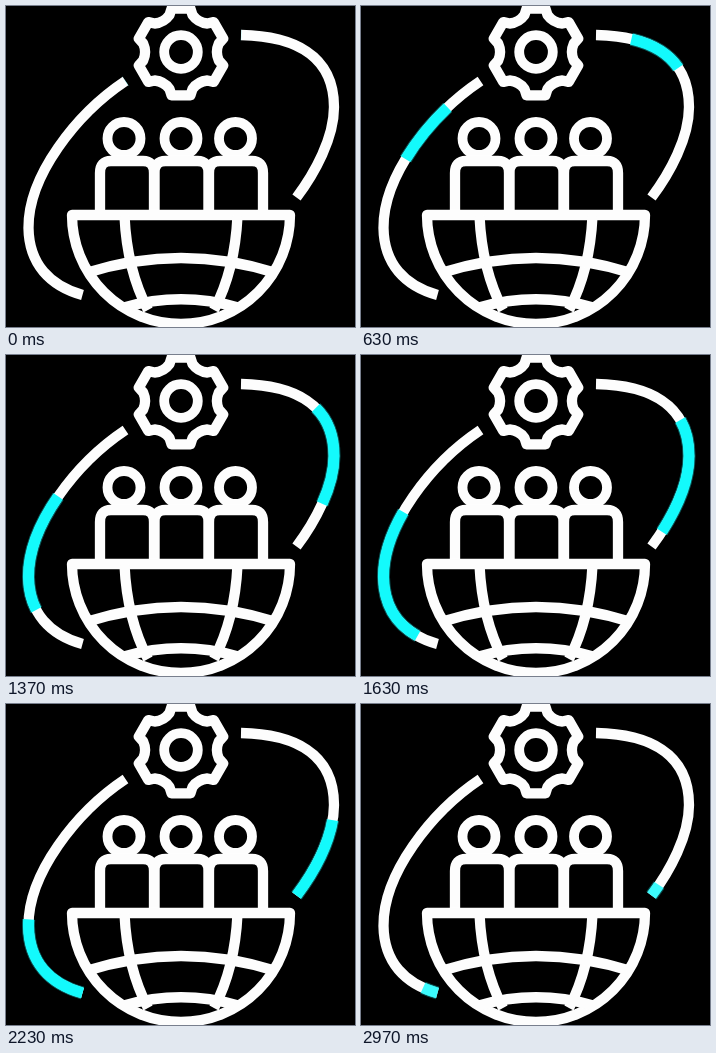
Animation of 349 by 321 pixels, one loop 3.01 s. Source, as an HTML page:

```html
<!DOCTYPE html>
<html lang="en">
<head>
<meta charset="utf-8">
<title>Team globe with orbiting arcs</title>
<style>
  html, body { margin: 0; width: 100%; height: 100%; overflow: hidden; background: #000; }
  svg { display: block; width: 349px; height: 321px; }
  .line { fill: none; stroke: #fdfdfd; stroke-width: 10.3; stroke-linejoin: round; }
  .ring { stroke-width: 9.8; }
  .glow { fill: none; stroke: #13fafc; stroke-width: 11; stroke-dasharray: 0 200; }
  .halo { stroke: #0b5a5c; stroke-width: 13; }
</style>
</head>
<body>
<svg viewBox="0 0 349 321">
  <defs>
    <path id="left" pathLength="100" d="M119.500 75C70 108 22 170 22.500 222C23 258 44 280 76.500 289"/>
    <path id="right" pathLength="100" d="M235 29C286 30 328 48 328 101C328 132 309 167 290.500 191.500"/>
    <path id="body" d="M-27 207V167Q-27 155 -16 155H16Q27 155 27 167V207"/>
    <circle id="head" cy="132.5" r="16.5"/>
  </defs>

  <use class="glow halo" href="#left"/>
  <use class="glow halo" href="#right"/>

  <g class="line">
    <use href="#left"/>
    <use href="#right"/>
    <path id="gear"/>
    <circle class="ring" cx="175" cy="46" r="16.8"/>
    <g id="team"></g>
    <path d="M66 209H284A109 109 0 0 1 66 209Z"/>
    <path d="M118.500 210Q121 264 142 304M231.500 210Q229 264 208 304"/>
    <path d="M80 267Q175 237 270 267M118 301.500Q175 285 232 301.500"/>
  </g>

  <use class="glow" href="#left"/>
  <use class="glow" href="#right"/>
</svg>
<script>
  const LOOP = 3010;
  const $ = id => document.getElementById(id);

  // Gear outline: six teeth joined by curved valleys.
  function gearPath(cx, cy, teeth) {
    const step = 2 * Math.PI / teeth;
    const at = (angle, out, side) => {
      const c = Math.cos(angle), s = Math.sin(angle);
      return (cx + out * c - side * s).toFixed(1) + ' ' + (cy + out * s + side * c).toFixed(1);
    };
    let d = '';
    for (let i = 0; i < teeth; i++) {
      const a = i * step - Math.PI / 2;
      d += (i ? 'L' : 'M') + at(a, 37, -11.5) + 'L' + at(a, 43.3, -9.5) +
        'L' + at(a, 43.3, 9.5) + 'L' + at(a, 37, 11.5) +
        'Q' + at(a + step / 2, 34, 0) + ' ' + at(a + step, 37, -11.5);
    }
    return d + 'Z';
  }
  $('gear').setAttribute('d', gearPath(175, 46, 6));

  // Each person: head x, body x.
  $('team').innerHTML = [[118, 121], [175, 175.5], [229.5, 230]].map(([head, body]) =>
    `<use class="ring" href="#head" x="${head}"/><use href="#body" x="${body}"/>`).join('');

  // Time in ms, then tail and head of the lit stretch in percent of the arc.
  const steps = [
    [0, 0, 0], [630, 15.3, 39.5], [1070, 26.5, 63], [1370, 34.5, 78.5],
    [1780, 45, 100], [1930, 50.5, 100], [2530, 77, 100], [2970, 94.4, 100], [LOOP, 96, 100]
  ];
  const frames = steps.map(([ms, tail, head]) => ({
    offset: ms / LOOP,
    strokeDasharray: `${head - tail} 200`,
    strokeDashoffset: -tail
  }));
  document.querySelectorAll('.glow').forEach(el => {
    el.animate(frames, { duration: LOOP, iterations: Infinity });
    el.animate([{ strokeOpacity: 1 }, { strokeOpacity: 1, offset: 0.94 }, { strokeOpacity: 0.78 }],
      { duration: LOOP, iterations: Infinity });
  });
</script>
</body>
</html>
```
